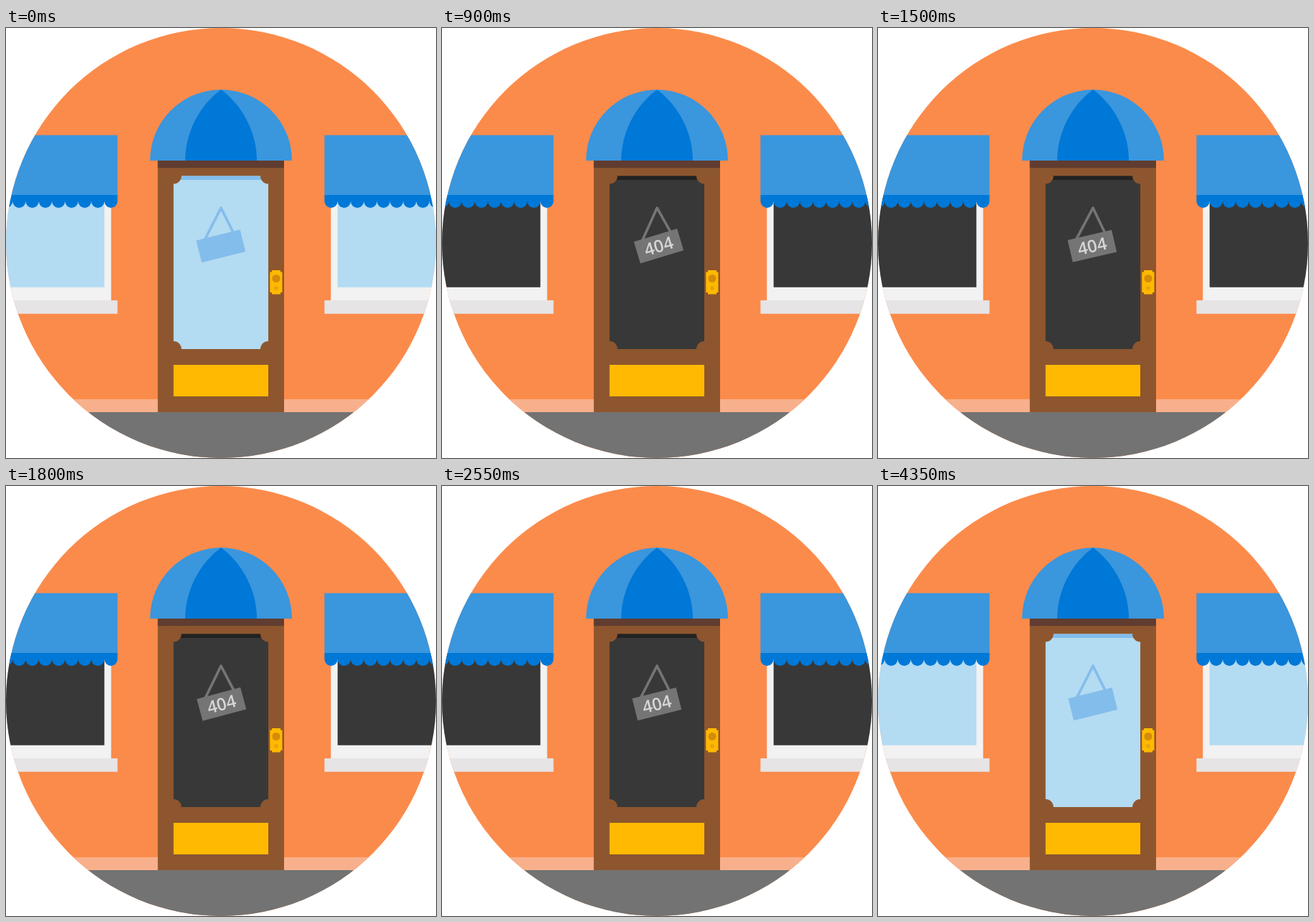
An HTML page for the animation above (4.5 s loop, 600 by 600 pixels).

```html
<!DOCTYPE html>
<html lang="en">
<head>
<meta charset="utf-8">
<title>404</title>
<style>
html, body { margin: 0; width: 100%; height: 100%; overflow: hidden; background: #fff; }
svg { display: block; width: 100vw; height: 100vh; }
text { font: 600 24px "Open Sans", "Noto Sans", sans-serif; text-anchor: middle; }
</style>
</head>
<body>
<svg viewBox="0 0 600 600">
  <defs>
    <clipPath id="disc"><circle cx="300" cy="300" r="300"/></clipPath>
    <g id="window">
      <path fill="#f2f2f2" d="M0 233H146.7V380H0z"/>
      <path class="glass" d="M0 233H137.3V361.7H0z"/>
      <path fill="#e6e4e5" d="M0 380H155.6V398.8H0z"/>
      <path fill="#3a96dd" d="M0 149.6H155.6V233H0z"/>
      <path id="scallops" fill="#0078d7"/>
    </g>
  </defs>
  <g clip-path="url(#disc)">
    <path fill="#fb8b4b" d="M0 0H600V600H0z"/>
    <path fill="#f8b08c" d="M0 518H600V536H0z"/>
    <path fill="#737373" d="M0 536H600V600H0z"/>
    <use href="#window"/>
    <use href="#window" transform="matrix(-1 0 0 1 600 0)"/>

    <path fill="#8e562e" d="M211.8 185H388V536H211.8z"/>
    <path fill="#603d30" d="M211.8 185H388V195.3H211.8z"/>
    <path class="glass" d="M233.8 206.4H366V448H233.8z"/>
    <path class="shade" d="M233.8 206.4H366V212H233.8z"/>
    <g fill="#8e562e">
      <circle cx="233.8" cy="206.4" r="11"/>
      <circle cx="366" cy="206.4" r="11"/>
      <circle cx="233.8" cy="448" r="11"/>
      <circle cx="366" cy="448" r="11"/>
    </g>
    <path fill="#ffb900" d="M233.8 470H366V514H233.8z"/>
    <path fill="#ffb900" d="M371 338H383V340.5H385.5V369H383V371.5H371V369H368.3V340.5H371z"/>
    <circle cx="377" cy="349.5" r="5.6" fill="#d48c0a"/>
    <circle cx="377" cy="363" r="2.9" fill="#eba50a"/>
    <path fill="#3a96dd" d="M201 185A99 99 0 0 1 399 185z"/>
    <path fill="#0078d7" d="M250 185C250 146 270 108 300 86C330 108 350 146 350 185z"/>

    <g id="sign">
      <path class="cord" fill="none" stroke-width="3.6" stroke-linejoin="round" d="M277 296L300 251L318 287"/>
      <g transform="translate(299.8 304.3) rotate(-14)">
        <path class="board" d="M-31.5 -15.8H31.5V15.8H-31.5z"/>
        <text id="label" y="8.6" fill="#d6d6d6">404</text>
      </g>
    </g>
  </g>
</svg>
<script>
const LOOP = 4500, STEP = 30;
const $ = id => document.getElementById(id);
const each = (cls, attr, value) =>
  document.querySelectorAll("." + cls).forEach(el => el.setAttribute(attr, value));

const glass = [[179, 219, 242], [56, 56, 56]];
const shade = [[131, 189, 236], [34, 34, 34]];
const board = [[131, 189, 236], [117, 117, 117]];

// Turning points of the swing: time in ms, angle in degrees
const swing = [[810, 0], [1050, -9], [1350, 7], [1650, -5], [1950, 3], [2250, -1], [2550, 0]];

const clamp = x => Math.min(1, Math.max(0, x));
const mix = ([a, b], p) => `rgb(${a.map((v, i) => Math.round(v + (b[i] - v) * p))})`;
const ease = x => (1 - Math.cos(Math.PI * x)) / 2;

function angleAt(t) {
  const i = swing.findIndex(([time]) => t < time);
  if (i < 1) return 0;
  const [t0, a0] = swing[i - 1], [t1, a1] = swing[i];
  return a0 + (a1 - a0) * ease((t - t0) / (t1 - t0));
}

function drawScallops() {
  const w = 18.3;
  let d = "M0 233H155.6V242H0z";
  for (let x = 155.6; x > 0; x -= w) d += `M${x} 241.8a${w / 2} ${w / 2} 0 0 1 ${-w} 0z`;
  $("scallops").setAttribute("d", d);
}

function draw(t) {
  const dark = clamp((t - 810) / 90) - clamp((t - 4260) / 90);
  each("glass", "fill", mix(glass, dark));
  each("shade", "fill", mix(shade, dark));
  each("board", "fill", mix(board, dark));
  each("cord", "stroke", mix(board, dark));
  $("label").setAttribute("opacity", dark);
  $("sign").setAttribute("transform", `rotate(${angleAt(t)} 300 250)`);
}

const start = performance.now();
function tick() {
  const t = (performance.now() - start) % LOOP;
  draw(Math.floor(t / STEP) * STEP);
  requestAnimationFrame(tick);
}
drawScallops();
tick();
</script>
</body>
</html>
```
